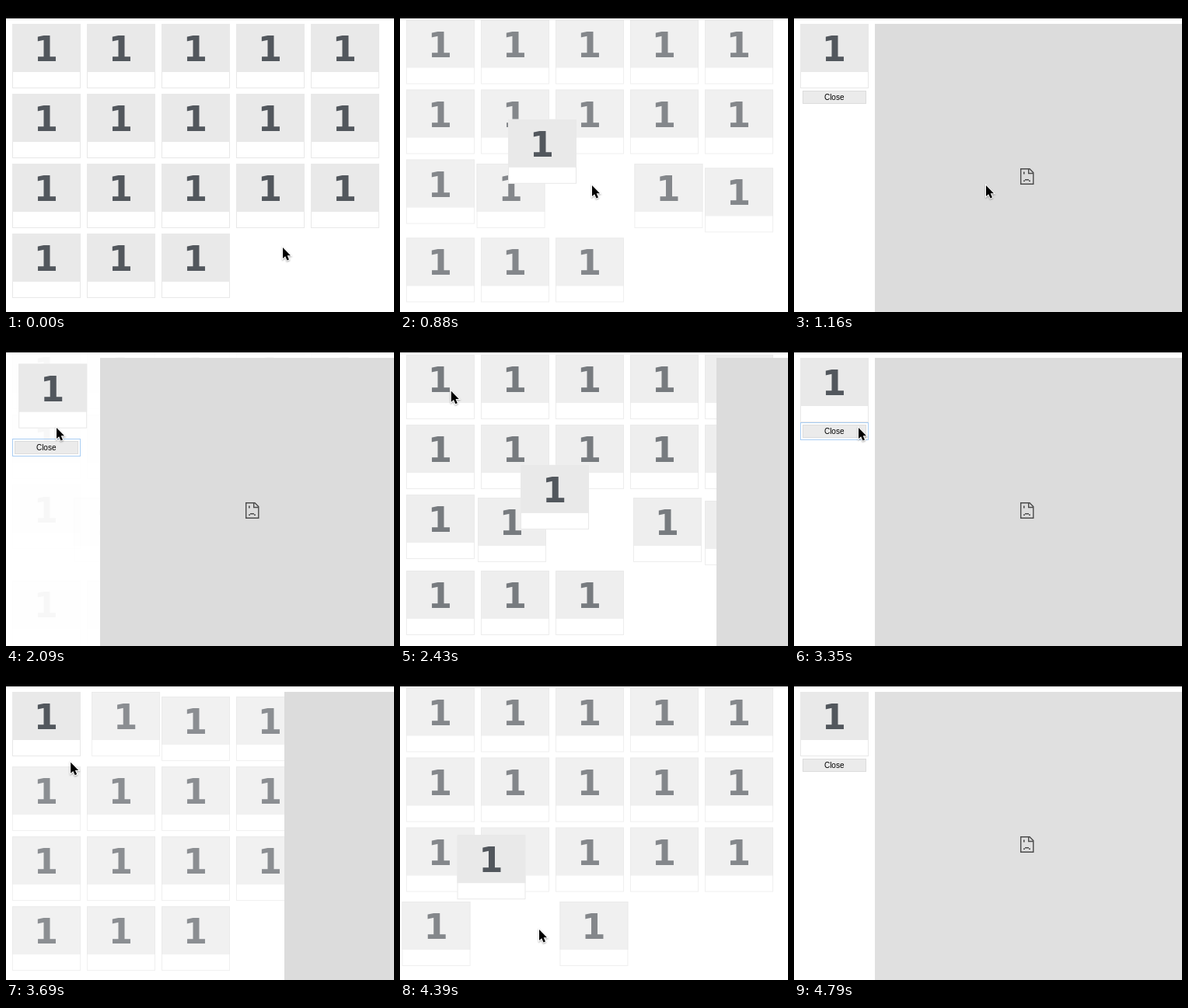
Write an HTML page with a canvas that moves like this. It is 499x394 px and loops after 5.31 s.

```html
<!DOCTYPE html>
<html lang="en">
<head>
<meta charset="utf-8">
<title>Card grid</title>
<style>
  html, body { margin: 0; width: 100%; height: 100%; overflow: hidden; background: #fff; }
  canvas { display: block; }
</style>
</head>
<body>
<canvas id="stage" width="499" height="394"></canvas>
<script>
const ctx = document.getElementById('stage').getContext('2d');
const LOOP = 5310, FADE_OUT = 170, FADE_IN = 470, CARDS = 18, DRIFT = 17;
const HOME = { x: 8, y: 23 };

// Each visit: a card opens into the panel, then closes again.
const visits = [
  { card: 12, open: 827, press: 2030, close: 2071, end: 2545, fill: '#dcdcdc' },
  { card: 0, open: 2727, press: 3350, close: 3389, end: 3865, fill: '#dcdcdc' },
  { card: 16, open: 4337, press: 9999, close: 9999, end: 9999, fill: '#e0e0e0' }
];

// Pointer path: time, x, y
const pointer = [
  [0, 356, 311], [290, 356, 311], [640, 247, 231], [1170, 247, 231],
  [1390, 73, 98], [1700, 70, 120], [1970, 65, 113], [2100, 65, 113],
  [2500, 66, 56], [2900, 66, 56], [3230, 83, 113], [3690, 83, 113],
  [3860, 112, 235], [4210, 179, 329], [4790, 179, 329]
];

const arrow = new Path2D('M0 0V14L3.2 11.2 5.5 16.5 8 15.4 5.7 10.2H10Z');
const clamp = v => Math.max(0, Math.min(1, v));
const mix = (a, b, p) => a + (b - a) * p;
const slot = i => ({ x: HOME.x + 96 * (i % 5), y: HOME.y + 90 * Math.floor(i / 5) });

function rect(x, y, w, h, color) {
  ctx.fillStyle = color;
  ctx.fillRect(x, y, w, h);
}

function frame(x, y, w, h, color) {
  ctx.strokeStyle = color;
  ctx.lineWidth = 1;
  ctx.strokeRect(x + 0.5, y + 0.5, w - 1, h - 1);
}

function label(text, x, y, font, color) {
  ctx.font = font;
  ctx.fillStyle = color;
  ctx.textAlign = 'center';
  ctx.fillText(text, x, y);
}

function drawCard(x, y, alpha) {
  ctx.globalAlpha = alpha;
  rect(x, y, 88, 83, '#fff');
  frame(x, y, 88, 83, '#e8e8e8');
  rect(x, y, 88, 62, '#e9e9e9');
  label('1', x + 43.5, y + 48, 'bold 45px "DejaVu Sans", sans-serif', '#52575d');
  ctx.globalAlpha = 1;
}

function drawButton(y, focused, alpha) {
  ctx.globalAlpha = alpha;
  if (focused) frame(8, y - 3, 88, 23, '#a9cdf3');
  rect(11, y, 82, 17, '#ebebeb');
  frame(11, y, 82, 17, '#dcdcdc');
  label('Close', 51.7, y + 11.5, '10px "Liberation Sans", Arial, sans-serif', '#000');
  ctx.globalAlpha = 1;
}

function drawPanel(x, fill) {
  rect(x, 23, 395, 371, fill);
  ctx.save();
  ctx.translate(x + 187, 209);
  ctx.strokeStyle = '#4a4a4a';
  ctx.lineWidth = 1.4;
  ctx.stroke(new Path2D('M.7 .7H12L16.8 5.5V20.3H.7ZM10.7 .7V6.5H16.8'));
  rect(4, 4.5, 1.6, 3, '#4a4a4a');
  rect(6, 14, 5, 1.5, '#4a4a4a');
  rect(4, 15.5, 2, 1.5, '#4a4a4a');
  rect(11, 15.5, 2, 1.5, '#4a4a4a');
  ctx.restore();
}

function drawPointer(t) {
  const next = pointer.findIndex(k => k[0] > t);
  if (next < 0) return;
  const [t0, x0, y0] = pointer[next - 1], [t1, x1, y1] = pointer[next];
  const p = (t - t0) / (t1 - t0);
  ctx.save();
  ctx.translate(mix(x0, x1, p), mix(y0, y1, p));
  ctx.shadowColor = 'rgba(0,0,0,.35)';
  ctx.shadowBlur = 2;
  ctx.shadowOffsetY = 1;
  ctx.strokeStyle = '#fff';
  ctx.lineWidth = 2;
  ctx.stroke(arrow);
  ctx.shadowColor = 'transparent';
  ctx.fillStyle = '#000';
  ctx.fill(arrow);
  ctx.restore();
}

// Neighbours part sideways, earlier cards rise and later ones sink.
function drift(offset) {
  if (Math.abs(offset) === 1) return [offset * DRIFT, 0];
  return [0, Math.sign(offset) * DRIFT];
}

function draw(t) {
  rect(0, 0, 499, 394, '#fff');
  const visit = visits.find(v => t >= v.open && t < v.end);
  const closing = visit && t >= visit.close;
  let hidden = 0, slide = 0;
  if (closing) {
    hidden = slide = 1 - clamp((t - visit.close) / FADE_IN);
  } else if (visit) {
    hidden = clamp((t - visit.open) / FADE_OUT);
    slide = clamp((t - visit.open - 55) / 140);
  }

  for (let i = 0; i < CARDS; i++) {
    if (visit && i === visit.card) continue;
    const { x, y } = slot(i);
    const [dx, dy] = visit ? drift(i - visit.card) : [0, 0];
    if (hidden < 1) drawCard(x + dx * hidden, y + dy * hidden, 1 - hidden);
  }
  if (visit) {
    if (slide > 0) drawPanel(Math.round(mix(499, 104, slide)), visit.fill);
    if (closing) drawButton(130, true, clamp(1.1 - (1 - hidden) * 2.5));
    else if (hidden > 0.5) drawButton(hidden < 1 ? 128 : 109, t >= visit.press, 1);
    const from = slot(visit.card);
    drawCard(mix(from.x, HOME.x, hidden), mix(from.y, HOME.y, hidden), 1);
  }
  rect(0, 0, 499, 16, '#000');
  drawPointer(t);
}

function tick() {
  draw(performance.now() % LOOP);
  requestAnimationFrame(tick);
}
tick();
</script>
</body>
</html>
```
